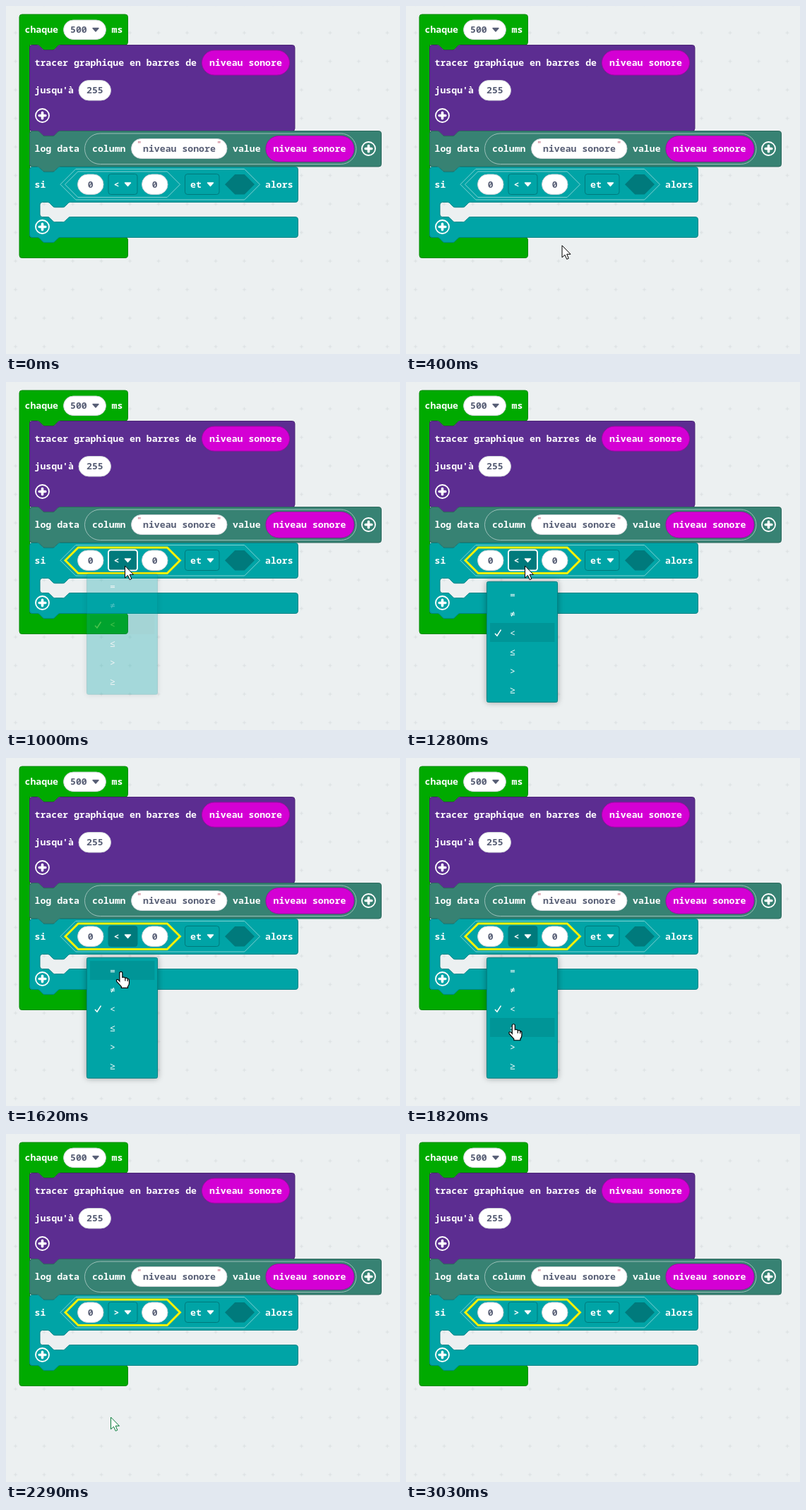
An HTML page for the animation above (3660 ms loop, 558 px wide and 494 px high).

```html
<!DOCTYPE html>
<html lang="fr">
<head>
<meta charset="utf-8">
<title>Blocs</title>
<style>
  html, body { margin: 0; width: 100%; height: 100%; overflow: hidden; background: #ecf0f1; }
  svg { display: block; width: 558px; height: 494px; }
  text { font: 700 13.2px "Noto Sans Mono", "DejaVu Sans Mono", monospace; fill: #fff; white-space: pre; }
  text.field { font-weight: 600; fill: #575e75; }
  text.quote { font-size: 11px; font-weight: 500; fill: #b3405a; }
  text.item { font-weight: 500; }
  #menu { filter: drop-shadow(0 0 4px rgba(0, 0, 0, .35)); }
</style>
</head>
<body>
<svg id="stage" viewBox="0 0 558 494"></svg>
<script>
const LOOP = 3660, TICK = 67.3;
const TEAL = '#00a4a6', TEAL_EDGE = '#008385', TEAL_DARK = '#007a7c', FIELD_EDGE = '#cfd3d8';
const OPERATORS = ['=', '≠', '<', '≤', '>', '≥'];
const MENU_TOP = 288.5, ROW = 27;

// Shape helpers
const R = 3.6;
const arc = (dx, dy, sweep = 1) => `a${R},${R} 0 0 ${sweep} ${dx * R},${dy * R}`;
const notch = s => `c${1.8 * s},0 ${2.7 * s},.9 ${3.6 * s},1.8 l${3.6 * s},3.6 c${.9 * s},.9 ${1.8 * s},1.8 ${3.6 * s},1.8
  h${10.8 * s} c${1.8 * s},0 ${2.7 * s},-.9 ${3.6 * s},-1.8 l${3.6 * s},-3.6 c${.9 * s},-.9 ${1.8 * s},-1.8 ${3.6 * s},-1.8`;
const path = (d, fill, stroke, width = 1, extra = '') =>
  `<path d="${d}" fill="${fill}" stroke="${stroke}" stroke-width="${width}" ${extra}/>`;
const rect = (x, y, w, h, r, fill, stroke = 'none', extra = '') =>
  `<rect x="${x}" y="${y}" width="${w}" height="${h}" rx="${r}" fill="${fill}" stroke="${stroke}" ${extra}/>`;
const label = (x, y, text, cls = '', extra = '') =>
  `<text x="${x}" y="${y}" class="${cls}" ${extra}>${text.replace('<', '&lt;')}</text>`;
const pill = (x, y, w, h, fill = '#fff', stroke = FIELD_EDGE) => rect(x, y, w, h, h / 2, fill, stroke);
const hexagon = (x, y, w, h, fill, stroke, width = 1, extra = '') =>
  path(`M${x},${y + h / 2} l${h / 2},${-h / 2} H${x + w - h / 2} l${h / 2},${h / 2} l${-h / 2},${h / 2} H${x + h / 2} Z`,
    fill, stroke, width, extra);
const triangle = (x, y, color) => path(`M${x - 4},${y - 2} h8 l-4,4.5 Z`, color, color, 1.4, 'stroke-linejoin="round"');
const plus = (x, y) =>
  `<circle cx="${x}" cy="${y}" r="9.5" fill="none" stroke="#fff" stroke-width="1.8"/>` +
  path(`M${x - 4.3},${y} h8.6 M${x},${y - 4.3} v8.6`, 'none', '#fff', 3.6, 'stroke-linecap="round"');

// Statement blocks share the left edge at x = 33.5
const blockTop = (y, right) => `M33.5,${y + R} ${arc(1, -1)} H44.3 ${notch(1)} H${right - R} ${arc(1, 1)}`;
const blockEnd = bottom => `V${bottom - R} ${arc(-1, 1)} H76.7 ${notch(-1)} H${33.5 + R} ${arc(-1, -1)} Z`;
const block = (y, right, bottom, fill, stroke) => path(`${blockTop(y, right)} ${blockEnd(bottom)}`, fill, stroke);

const background = `
  <pattern id="grid" x="-6.5" y="18" width="40.5" height="40.5" patternUnits="userSpaceOnUse">
    <path d="M17.5,20 h5 M20,17.5 v5" stroke="#dadfe1"/>
  </pattern>
  <rect width="558" height="494" fill="#ecf0f1"/><rect width="558" height="494" fill="url(#grid)"/>`;

const everyBlock =
  path(`M19,${12 + R} ${arc(1, -1)} H${172.5 - R} ${arc(1, 1)} V${55 - R} ${arc(-1, 1)} H76.7 ${notch(-1)} H33.5 V328.5
    H${172.5 - R} ${arc(1, 1)} V${357.5 - R} ${arc(-1, 1)} H${19 + R} ${arc(-1, -1)} Z`, '#00aa00', '#008800') +
  label(26.5, 38, 'chaque') + pill(81.5, 20, 60, 27.5) +
  label(91, 38, '500', 'field') + triangle(127, 33.5, '#575e75') + label(149.5, 38, 'ms');

const variable = (x, y, w, h) => pill(x, y, w, h, '#d400d4', '#aa00aa') + label(x + 10.5, y + h / 2 + 4, 'niveau sonore');

const plotBlock = block(55.5, 409, 177.5, '#5c2d91', '#4a2474') +
  label(40.5, 85, 'tracer graphique en barres de') + variable(277.5, 63, 124, 35) +
  label(40.5, 124, "jusqu'à") + pill(103, 105.5, 45.5, 28.5) +
  label(114, 124, '255', 'field') + plus(51.5, 155.5);

const logBlock = block(177.5, 531.5, 228, '#378273', '#2c685c') +
  label(40.5, 207, 'log data') + pill(111.5, 181, 384.5, 43.5, '#378273', '#9bc0b9') +
  label(122, 207, 'column') + pill(177.5, 188.5, 135.5, 28) +
  label(185.5, 200, '"', 'quote') + label(194, 207, 'niveau sonore', 'field') + label(298.5, 200, '"', 'quote') +
  label(321, 207, 'value') + variable(368, 184.5, 125, 36.5) + plus(513.5, 202.5);

const zeroField = x => pill(x, 239, 36.5, 28.5) + label(x + 14.3, 258, '0', 'field');

const ifBlock =
  path(`${blockTop(228.5, 413.5)} V${278.5 - R} ${arc(-1, 1)} H91.2 ${notch(-1)} H${48 + R} ${arc(-1, 1, 0)}
    V${299.5 - R} ${arc(1, 1, 0)} H58.8 ${notch(1)} H${413.5 - R} ${arc(1, 1)} ${blockEnd(328.5)}`, TEAL, TEAL_EDGE) +
  label(40.5, 258, 'si') + hexagon(77, 231.5, 282.5, 43.5, TEAL, '#80d1d2') +
  hexagon(83.5, 235, 163, 36.5, TEAL, '#80d1d2') +
  hexagon(84, 235, 162.5, 36.5, 'none', '#fff200', 3, 'id="selection"') +
  zeroField(101.5) + rect(145, 238.5, 41, 29, 3.6, TEAL, TEAL_DARK, 'id="dropdown"') +
  label(152.5, 258, '<', '', 'id="operator"') + triangle(172.5, 253, '#fff') + zeroField(192.5) +
  rect(253.5, 238.5, 48.5, 29, 3.6, TEAL, TEAL_DARK) + label(261, 258, 'et') + triangle(289.5, 253, '#fff') +
  hexagon(310, 239, 42, 28.5, TEAL_DARK, 'none') + label(367, 258, 'alors') + plus(51.5, 313.5);

const menu = `<g id="menu">${rect(114.5, 283.5, 100, 171, 2, TEAL, TEAL_EDGE)}
  ${rect(119, 0, 91.5, ROW, 0, '#009597', 'none', 'id="hover"')}
  ${path('M126,357 l3,3.2 l5.5,-8.5', 'none', '#fff', 1.5)}
  ${OPERATORS.map((op, i) => label(147, 306.5 + ROW * i, op, 'item')).join('')}</g>`;

const pointers =
  path('M0,0 V17 L4,13.4 L6.7,19.5 L9.3,18.4 L6.7,12.4 H12 Z', '#fff', '#000', 1, 'id="arrow"') +
  path(`M-1.5,1 a2,2 0 0 1 4,0 V7 q3,-1 4,1 q3,-.8 3.4,1.2 q2.2,-.4 2.2,2 V15 q0,3 -2,5 V22 H1 V20 L-5.5,13
    q-1.2,-2.5 .8,-3 q1.5,0 3.2,2.5 Z M6.5,8 v4 M9.9,9.2 v3.4`, '#fff', '#000', 1.2, 'id="hand"');

const stage = document.getElementById('stage');
stage.innerHTML = background + everyBlock + plotBlock + logBlock + ifBlock + menu + pointers;
const part = Object.fromEntries([...stage.querySelectorAll('[id]')].map(el => [el.id, el]));

const clamp = u => Math.min(1, Math.max(0, u));
const smooth = u => u * u * (3 - 2 * u);
const mix = (a, b, u) => a.map((v, i) => v + (b[i] - v) * u);
const show = (el, visible) => el.setAttribute('visibility', visible ? 'visible' : 'hidden');

const ENTRY = [303, 463], ON_FIELD = [168.5, 261], ON_ITEM = [148.5, 402], EXIT = [324, 484];
function pointerAt(k) {
  if (k < 21) return mix(ENTRY, ON_FIELD, 1 - (1 - clamp((k - 3) / 8)) ** 2);
  if (k < 40) return mix(ON_FIELD, ON_ITEM, smooth(clamp((k - 21) / 8)));
  return mix(ON_ITEM, EXIT, clamp((k - 40) / 4) ** 1.5);
}

function draw(time) {
  const k = Math.floor((time + 12) / TICK); // the picture advances about 15 times a second
  const [x, y] = pointerAt(k);
  const present = k >= 3 && k < 45;
  const picked = k >= 33;
  const pressed = k >= 14 && !picked;
  const overField = present && x > 145 && x < 186 && y > 239 && y < 268;
  const overMenu = k >= 18 && k < 34 && y > MENU_TOP;

  show(part.selection, k >= 13);
  part.dropdown.setAttribute('fill', pressed ? TEAL_DARK : TEAL);
  part.dropdown.setAttribute('stroke', overField ? '#fff' : TEAL_DARK);
  part.dropdown.setAttribute('stroke-width', overField ? 2 : 1);
  part.operator.textContent = picked ? '>' : '<';

  const opening = smooth(clamp(.364 + .27 * (k - 15)));
  show(part.menu, k >= 15 && !picked);
  part.menu.setAttribute('opacity', opening);
  part.menu.setAttribute('transform', `translate(0 ${-16 * (1 - opening)})`);
  part.hover.setAttribute('y', MENU_TOP + ROW * (overMenu ? Math.floor((y - MENU_TOP) / ROW) : 2) - 0.5);

  show(part.arrow, present && !overMenu);
  show(part.hand, present && overMenu);
  part.arrow.setAttribute('stroke', picked ? '#0a7d3c' : '#000');
  part.arrow.setAttribute('transform', `translate(${x} ${y})`);
  part.hand.setAttribute('transform', `translate(${x + .2} ${y - 1.2})`);
}

const start = performance.now();
function loop() {
  draw((performance.now() - start) % LOOP);
  requestAnimationFrame(loop);
}
loop();
</script>
</body>
</html>
```
